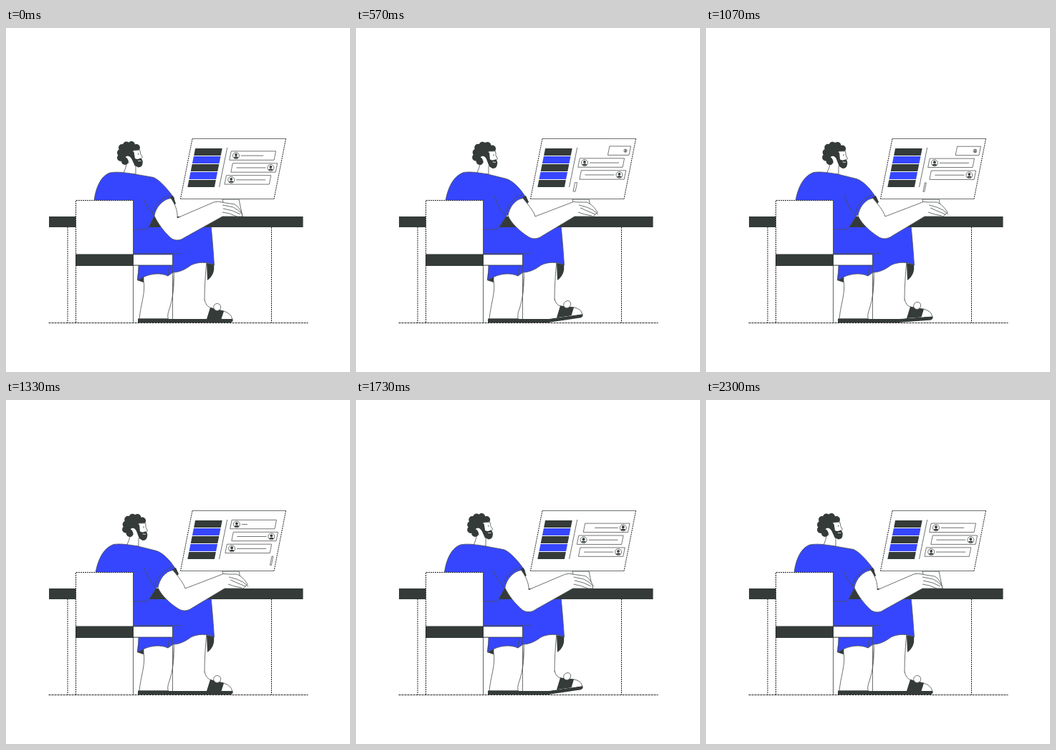
An HTML page with a canvas that plays this animation: 480 px wide and 480 px high, repeating every 2.33 s.

```html
<!DOCTYPE html>
<html lang="en">
<head>
<meta charset="utf-8">
<title>Chatting at the desk</title>
<style>
html, body { margin: 0; width: 100%; height: 100%; overflow: hidden; background: #fff; }
canvas { display: block; width: 480px; height: 480px; }
</style>
</head>
<body>
<canvas id="stage" width="480" height="480"></canvas>
<script>
const ctx = document.getElementById('stage').getContext('2d');
const DARK = '#343b39', BLUE = '#3646ff', WHITE = '#fff', LINE = '#4a4f4e';
const LOOP = 2330, SCROLL = LOOP / 5, GAP = 16.9;

const clamp = v => Math.max(0, Math.min(1, v));
const lerp = (a, b, k) => a + (b - a) * k;
const ease = v => v < .5 ? 4 * v ** 3 : 1 - 4 * (1 - v) ** 3;

// Blends two path strings that share the same commands.
function mix(a, b, k) {
  const target = b.match(/-?[\d.]+/g);
  let i = 0;
  return a.replace(/-?[\d.]+/g, n => lerp(+n, +target[i++], k).toFixed(2));
}

function shape(d, fill, stroke = LINE, dash = [], width = .8) {
  const path = new Path2D(d);
  if (fill) { ctx.fillStyle = fill; ctx.fill(path); }
  if (stroke) {
    ctx.strokeStyle = stroke;
    ctx.lineWidth = width;
    ctx.setLineDash(dash);
    ctx.stroke(path);
  }
}
const line = d => shape(d);
const dotted = (d, dash = [2, 1]) => shape(d, null, '#222', dash, 1);

function dot(x, y, r, fill, stroke) {
  const path = new Path2D();
  path.arc(x, y, Math.max(0, r), 0, 7);
  shape(path, fill, stroke);
}

const slant = (x, y) => x - .2 * (y - 154);
function slab(x, y, w, h, fill, stroke) {
  const corners = [[x, y], [x + w, y], [x + w, y + h], [x, y + h]];
  shape('M' + corners.map(([cx, cy]) => slant(cx, cy) + ' ' + cy).join('L') + 'Z', fill, stroke);
}

// Scroll progress for one pair of messages.
const KEYS = [[0, 0], [.227, .3], [.652, .335], [.712, .505], [.794, .68], [.854, .865], [.93, 1.01], [1, 1]];
function scrolled(p) {
  const i = KEYS.findIndex(key => key[0] > p);
  const [x0, y0] = KEYS[i - 1], [x1, y1] = KEYS[i];
  return lerp(y0, y1, (p - x0) / (x1 - x0));
}

function message(y, fromLeft) {
  if (y < 166 || y > 225) return;
  const size = Math.max(.03, clamp((y - 166) / 7.5) ** 2 - clamp((y - 214) / 8) ** 3);
  const dir = fromLeft ? 1 : -1, edge = fromLeft ? 317.8 : 385.6, w = 62.3 * size;
  slab(fromLeft ? edge : edge - w, y - 6.2, w, 12.4, WHITE, '#555');

  const x = slant(edge, y) + dir * 8 * Math.min(1, size + .3);
  const r = 4.5 * size;
  if (size > .2) {
    dot(x, y, r, WHITE, LINE);
    dot(x, y - r * .25, r * .42, DARK, null);
    const bust = new Path2D();
    bust.ellipse(x, y + r * .8, r * .68, r * .52, 0, Math.PI, 0);
    shape(bust, DARK, null);
  }
  const grown = Math.min(clamp((y - 172) / 8), clamp((221 - y) / 5));
  if (grown > 0) line(`M${x + dir * 7} ${y}h${dir * 41 * grown}`);
}

function monitor(t) {
  shape('M302 239H325L330 263H308Z', WHITE);
  shape('M260 154.5H390.5L374 238.5H243.5Z', WHITE, null);
  line('M260 154.5H390.5M374 238.5H243.5');
  dotted('M260 154.5L243.5 238.5M390.5 154.5L374 238.5');
  for (let i = 0; i < 5; i++) slab(266.9, 168 + 11 * i, 37.6, 10, i % 2 ? BLUE : DARK, null);
  line('M308.7 167L297.5 222');
  const shift = 2 * GAP * scrolled(t % SCROLL / SCROLL);
  for (let k = -3; k < 3; k++) message(178 + GAP * k + shift, k % 2 === 0);
}

function legs(t) {
  const tap = [563, 1147, 1730].reduce((sum, at) => sum + Math.cos(clamp(Math.abs(t - at) / 160) * Math.PI / 2) ** 2, 0);
  shape('M280 328L290 330Q292 344 281 352Z', DARK, null);
  shape('M184 342L183 352L192 355L194 344Z', DARK, null);
  shape('M224 343L226 350L235 353V340Z', DARK, null);
  shape('M192 338V352C195 370 188 384 186 406H230L235 338Z', WHITE);
  shape('M184 405.5H229V411H184Z', DARK, null);
  shape('M234 335C235 363 233 376 228 392Q224 402 227 407H272L277 380Q277 355 280 325Z', WHITE, null);
  line('M234 335C235 363 233 376 228 392Q224 402 227 407M277 380Q277 355 280 325');
  shape('M224 406H270V411H228Q224 411 224 406Z', DARK, null);

  // The front of the foot shears upwards from the heel.
  ctx.save();
  ctx.transform(1, -.145 * tap, 0, 1, 0, .145 * tap * 268);
  shape('M268 406H316.5V409L314 411H268Z', DARK, null);
  shape('M277 379Q279 389 287 391L304 395Q315 399 315.5 406H268Z', WHITE, null);
  line('M277 379Q279 389 287 391L304 395Q315 399 315.5 406');
  shape('M285 390L304 395L300.5 406H280Z', DARK, null);
  dot(294.7, 389.5, 5, WHITE, LINE);
  ctx.restore();

  shape('M178 276H286C288 295 289.5 315 290.5 331C281 326 268 326 258 331C249 338 240 341 233 341L226 346C215 341 203 343 193 347L184 352L185 331H178Z', BLUE, LINE);
  line('M178 314.5H244');
  line('M229 331Q226 339 226 346');
}

const CURLS = [[160, 174], [162, 167], [168, 163.5], [175, 163], [182, 167], [160, 181], [166, 186]];
function head(t, k) {
  shape(mix('M169 187Q167 196 163.5 204H181V192Z', 'M174 187Q172 196 168 204H185L187 194Z', k), WHITE);
  ctx.save();
  ctx.translate(172 + 7.3 * k, 178 + .6 * k);
  ctx.rotate(.08 * k);
  ctx.translate(-172, -178);
  CURLS.forEach(([x, y]) => dot(x, y, 5, DARK, null));
  dot(171, 175, 10.5, DARK, null);
  shape('M177 171L186.5 170Q188 174 187.5 175.5L190.5 180.5L188.5 182L189.5 187L179 186Z', WHITE, LINE);
  shape('M175 173H178.5L180 182Q184 184 188 181.5Q191.5 184 190.5 189Q190.5 194 184.5 194.5L180 192Q177 188 175 182Z', DARK, null);
  shape('M184 185.5H188.5', null, WHITE);
  const blink = clamp(1 - Math.abs(t - 2235) / 50);
  line(`M184.5 ${174.5 + 1.3 * blink}V${177 - blink}`);
  shape('M166.5 180Q171 176 175 182L179 191Q175 195 172 189Q170 181 166.5 180Z', WHITE, null);
  ctx.restore();
}

function torso(k) {
  shape(mix(
    'M123 241C125 225 131 207 145 202C156 200 168 202 180 204L206 208.5C216 213 228 228 235 238L207 262L200 276Q199 281 193 281H124Z',
    'M125 241C128 224 135 207 150 201.5C160 200 172 202 184 204L210 210.5C221 214 233 228 240 242L210 262L201 276Q199 281 193 281H126Z', k), BLUE);
  line(mix('M191 238Q197 252 207 262', 'M193 234Q199 251 208 262', k));
  shape(mix('M229 236L233 234L237 245L235 247Z', 'M232 236L237 234L241 243L239 245Z', k), DARK, null);
  line(mix('M204 260C207 246 217 237 230 233', 'M208 260C211 246 221 236 234 232', k));
}

function arm(k) {
  shape(mix(
    'M207 262C209 250 219 239 230 237.5C235 244 240 255 239 265L290 243Q296 241 303 243.5L319 246Q325 249 329 259L330 263H302L248 293C243 297 235 297 230 293C221 285 212 273 207 262Z',
    'M212 262C214 250 222 239 233 237.5C238 244 248 255 250 263L297 245Q303 241 310 243L322 243Q330 246 337 257L331 263H305L260 290C253 295 246 295 240 291C229 284 217 273 212 262Z', k), WHITE);
  line(mix('M302 247L317 250Q323 253 330 260', 'M311 247L322 250Q331 253 338 260', k));
  line(mix('M303 252L316 255L327 260', 'M313 251L322 255L334 260', k));
  line(mix('M302 257L312 259L322 263', 'M310 257L319 260L329 262', k));
}

function chair() {
  line('M232.5 331V406');
  shape('M177.5 316H232.5V331H177.5Z', WHITE, DARK);
  shape('M97.5 240.5H177.5V411H97.5Z', WHITE, null);
  shape('M97 315.5H178V332H97Z', DARK, null);
  dotted('M97.5 411V240.5H177.5');
  shape('M177.5 240.5V411', null, DARK);
}

const lean = (t, span) => ease(clamp(t / span)) - ease(clamp((t - 1360) / span));

function draw(now) {
  const t = now % LOOP;
  const body = lean(t, 580);
  ctx.fillStyle = WHITE;
  ctx.fillRect(0, 0, 480, 480);
  dotted('M59.5 411.5H421.5', [3, 1]);
  dotted('M86 278V411M370.5 278V411');
  monitor(t);
  legs(t);
  shape('M60 263H414.5V278H60Z', DARK, null);
  head(t, lean(t, 460));
  torso(body);
  arm(body);
  chair();
  requestAnimationFrame(() => draw(performance.now()));
}
draw(performance.now());
</script>
</body>
</html>
```
